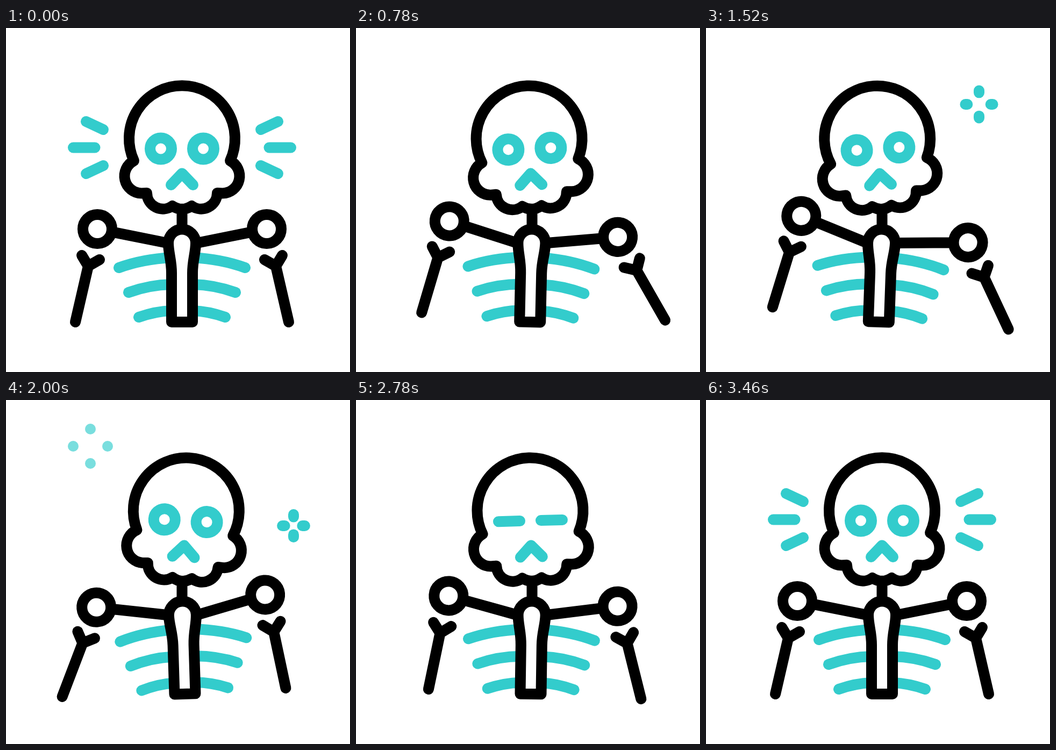
Write an HTML page with a canvas that moves like this. It is 640x640 px and loops after 3.5 s.

```html
<!DOCTYPE html>
<html lang="en">
<head>
<meta charset="utf-8">
<title>Dancing skeleton</title>
<style>
html, body { margin: 0; width: 100%; height: 100%; overflow: hidden; background: #fff; }
canvas { display: block; width: 100vmin; height: 100vmin; }
</style>
</head>
<body>
<canvas id="stage" width="640" height="640"></canvas>
<script>
const ctx = document.getElementById('stage').getContext('2d');
const LOOP = 3500, TEAL = '#33cccc', BLACK = '#000', CENTER = 327.5;

// time, arm swing, head tilt, left forearm, right forearm (degrees)
const POSES = [
  [0, 0, 0, 0, 0],
  [80, 0, 0, 0, 0],
  [560, 20, -7.4, -10, -30.4],
  [1120, -20, 7.4, 30, 10],
  [1640, 15.3, -5.5, 0.4, -15.2],
  [2160, -10.7, 5.9, 9.9, 5.4],
  [2600, 8.4, -3.1, -2, -1.6],
  [3040, -3, 1.1, 0, 0],
  [3460, 0, 0, 0, 0],
  [LOOP, 0, 0, 0, 0]
];
// start time, x, y
const STARS = [[980, 102.5, 280], [1377, 508, 142], [1525, 157, 86], [1900, 535, 234]];
const RAYS = [[181, 189, 149, 174], [165.5, 222.5, 125, 222.5], [181, 256, 149, 271]];

const SKULL = new Path2D('M238 247A98.5 98.5 0 1 1 417 247A32 32 0 0 1 403 307.5L393 307' +
  'A30 30 0 0 1 345.5 331Q327.5 343 309.5 331A30 30 0 0 1 262 307L252 307.5A32 32 0 0 1 238 247Z');
const STERNUM = new Path2D('M308 547V456C308 432 302 418 302 400A25.5 25.5 0 0 1 353 400' +
  'C353 418 347 432 347 456V547Z');
const RIBS = new Path2D('M210 446Q254 430 308 427M228 492Q266 478 308 477M247 538Q278 527 308 526');
const NOSE = new Path2D('M307 292L327.5 270.5L348 292');
const NECK = new Path2D('M327.5 335V375');
const UPPER_ARM = new Path2D('M300 400L197 379.4M197 374A27 27 0 1 1 143 374A27 27 0 1 1 197 374');
const FOREARM = new Path2D('M141 423L153 443L174 431M153 443L129 547');

const clamp = v => Math.max(0, Math.min(1, v));
const ease = p => (1 - Math.cos(Math.PI * p)) / 2;
const progress = (t, from, to) => clamp((t - from) / (to - from));

function poseAt(t) {
  const i = POSES.findIndex(pose => pose[0] > t);
  const a = POSES[i - 1], b = POSES[i];
  const k = ease(progress(t, a[0], b[0]));
  return a.map((v, j) => v + (b[j] - v) * k).slice(1);
}

function group(draw) {
  ctx.save();
  draw();
  ctx.restore();
}

function spin(degrees, x, y) {
  ctx.translate(x, y);
  ctx.rotate(degrees * Math.PI / 180);
  ctx.translate(-x, -y);
}

function mirror() {
  ctx.translate(2 * CENTER, 0);
  ctx.scale(-1, 1);
}

function stroke(path, color, fill) {
  if (fill) {
    ctx.fillStyle = fill;
    ctx.fill(path);
  }
  ctx.strokeStyle = color;
  ctx.stroke(path);
}

function line(x1, y1, x2, y2) {
  const path = new Path2D();
  path.moveTo(x1, y1);
  path.lineTo(x2 + 0.01, y2);
  stroke(path, TEAL);
}

function drawRays(t) {
  const leave = progress(t, 80, 480), enter = ease(progress(t, 3000, 3300));
  if (leave === 1 && enter === 0) return;
  for (const [x1, y1, x2, y2] of RAYS) {
    const at = k => [x1 + (x2 - x1) * k, y1 + (y2 - y1) * k];
    const inner = enter ? 0 : 1.47 * ease(leave);
    const outer = enter || 1 + 0.47 * ease(clamp(leave * 1.5));
    line(...at(inner), ...at(outer));
  }
}

function drawStar(age, x, y) {
  if (age <= 0 || age >= 535) return;
  const p = clamp(age / 400);
  const offset = 32 * (1 - (1 - p) ** 3), half = 3 * (1 - p);
  ctx.globalAlpha = 1 - progress(age, 445, 535);
  ctx.lineWidth = 20 * clamp(p * 8);
  ctx.translate(x, y);
  for (let i = 0; i < 4; i++) {
    line(offset - half, 0, offset + half, 0);
    ctx.rotate(Math.PI / 2);
  }
}

function drawEye(x, y, open) {
  if (open < 0.03) return line(x - 20, y, x + 20, y);
  const path = new Path2D();
  path.ellipse(x, y, 20, 20 * open, 0, 0, 7);
  stroke(path, TEAL);
}

// bend is the forearm's angle on the stage, so the swing is taken off again
function drawArm(swing, bend) {
  spin(swing, 300, 400);
  stroke(UPPER_ARM, BLACK);
  spin(bend - swing, 168, 377);
  stroke(FOREARM, BLACK);
}

function draw(t) {
  const [swing, tilt, left, right] = poseAt(t);
  ctx.fillStyle = '#fff';
  ctx.fillRect(0, 0, 640, 640);
  ctx.lineWidth = 20;
  ctx.lineCap = ctx.lineJoin = 'round';

  drawRays(t);
  group(() => { mirror(); drawRays(t); });
  for (const [start, x, y] of STARS) group(() => drawStar(t - start, x, y));

  group(() => {
    spin(-tilt * 0.52, CENTER, 373);
    stroke(RIBS, TEAL);
    mirror();
    stroke(RIBS, TEAL);
  });
  stroke(NECK, BLACK);
  group(() => {
    spin(tilt, CENTER, 335);
    stroke(SKULL, BLACK, '#fff');
    const open = ease(clamp((Math.abs(t - 2780) - 20) / 120));
    drawEye(288, 224.5, open);
    drawEye(367, 224.5, open);
    stroke(NOSE, TEAL);
  });
  group(() => drawArm(swing, left));
  group(() => { mirror(); drawArm(-swing, -right); });
  group(() => {
    spin(-tilt * 0.52, CENTER, 373);
    stroke(STERNUM, BLACK, '#fff');
  });
}

function tick() {
  draw(performance.now() % LOOP);
  requestAnimationFrame(tick);
}
tick();
</script>
</body>
</html>
```
